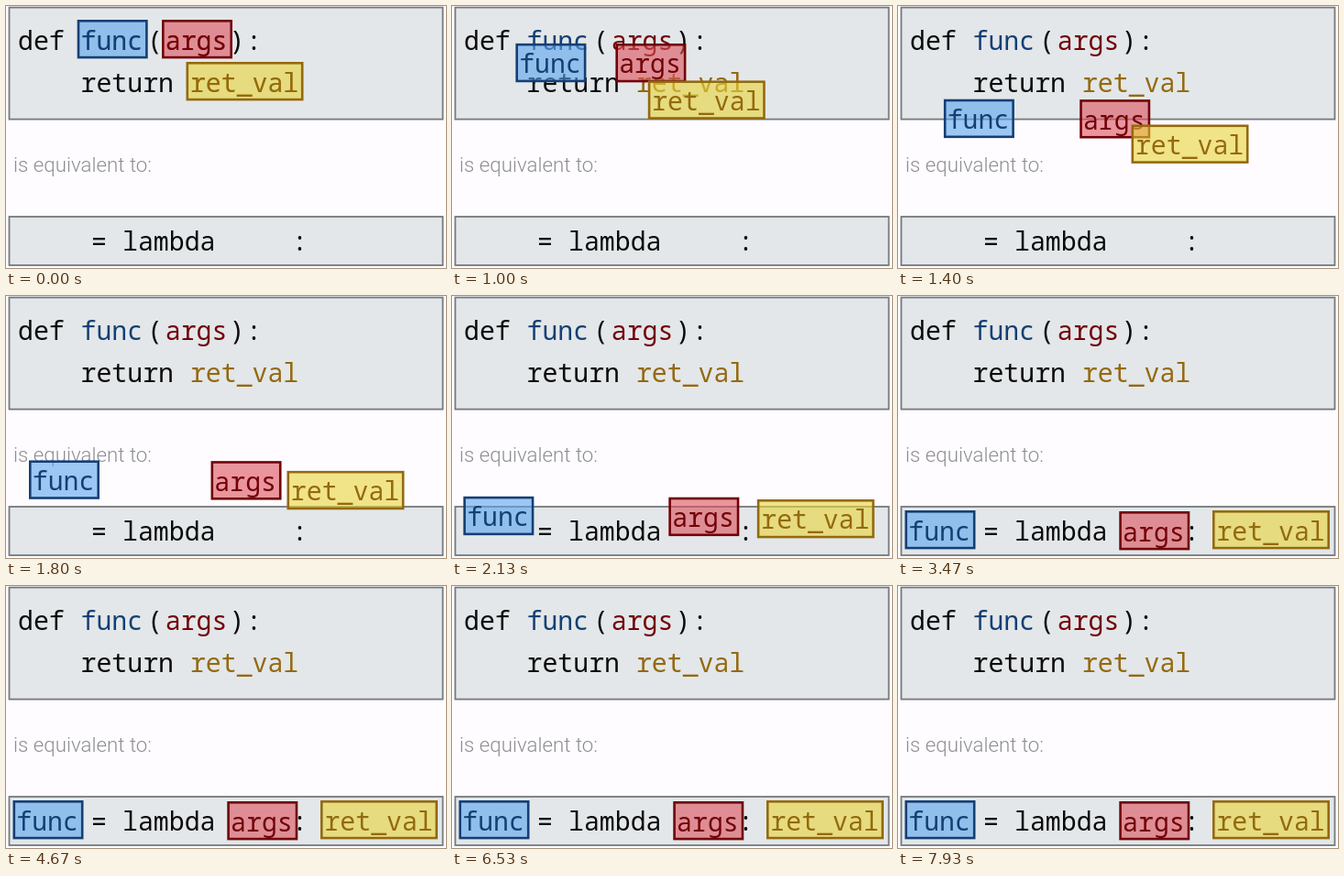
Animation of 480 by 286 pixels, one loop 8 s. Source, as an HTML page:

```html
<!DOCTYPE html>
<html lang="en">
<head>
<meta charset="utf-8">
<title>def and lambda</title>
<style>
html, body { margin: 0; width: 100%; height: 100%; overflow: hidden; background: #fefcff; }
svg { display: block; width: 100vw; height: 100vh; }
text { font: 28.2px "Noto Sans Mono", "DejaVu Sans Mono", monospace; white-space: pre; }
.note { font: 300 22.3px Roboto, "Open Sans", sans-serif; fill: #8e8e92; }
.panel { fill: #e3e7e9; stroke: #75797c; stroke-width: 1.8; }
</style>
</head>
<body>
<svg id="stage" viewBox="0 0 480 286"></svg>
<script>
const LOOP = 8000, START = 520, MOVE = 1980;
const stage = document.getElementById("stage");

function add(parent, tag, attrs, content = "") {
  const el = document.createElementNS("http://www.w3.org/2000/svg", tag);
  for (const key in attrs) el.setAttribute(key, attrs[key]);
  el.textContent = content;
  return parent.appendChild(el);
}

const label = (parent, x, y, content, fill = "#0b0b0b") =>
  add(parent, "text", { x, y, fill }, content);

const panel = (y, height) =>
  add(stage, "rect", { class: "panel", x: 3.5, y, width: 473, height });

panel(1.6, 122);
panel(230, 53);
add(stage, "text", { class: "note", x: 8, y: 181 }, "is equivalent to:");

[
  [13, 47.5, "def"], [154, 47.5, "("], [243.5, 47.5, ")"], [262, 47.5, ":"],
  [81.5, 93.5, "return"],
  [93, 267, "="], [127, 267, "lambda"], [312, 267, ":"]
].forEach(([x, y, content]) => label(stage, x, y, content));

const tags = [
  { name: "func", from: [77.7, 15], to: [7.5, 234], w: 77, pad: 3.8, ink: "#143f74", fill: "#5ca6ee" },
  { name: "args", from: [170, 15], to: [241.3, 235], w: 77, pad: 3.8, ink: "#720008", fill: "#de525c" },
  { name: "ret_val", from: [196.5, 61], to: [343, 234], w: 128, pad: 4.4, ink: "#94690f", fill: "#ead63a" }
];

for (const { name, from: [x, y], pad, ink } of tags) label(stage, x + pad, y + 32.5, name, ink);

for (const tag of tags) {
  tag.group = add(stage, "g", {});
  add(tag.group, "rect", {
    x: 1.3, y: 1.3, width: tag.w - 2.6, height: 39.8,
    fill: tag.fill, "fill-opacity": 0.6, stroke: tag.ink, "stroke-width": 2.6
  });
  label(tag.group, tag.pad, 32.5, tag.name, tag.ink);
}

const ease = u => u < 0.5 ? 2 * u * u : 1 - 2 * (1 - u) ** 2;

function draw(t) {
  const p = ease(Math.min(1, Math.max(0, (t - START) / MOVE)));
  for (const { group, from, to } of tags) {
    const [x, y] = from.map((v, i) => v + (to[i] - v) * p);
    group.setAttribute("transform", `translate(${x} ${y})`);
  }
}

const begin = performance.now();
function tick() {
  draw((performance.now() - begin) % LOOP);
  requestAnimationFrame(tick);
}
tick();
</script>
</body>
</html>
```
